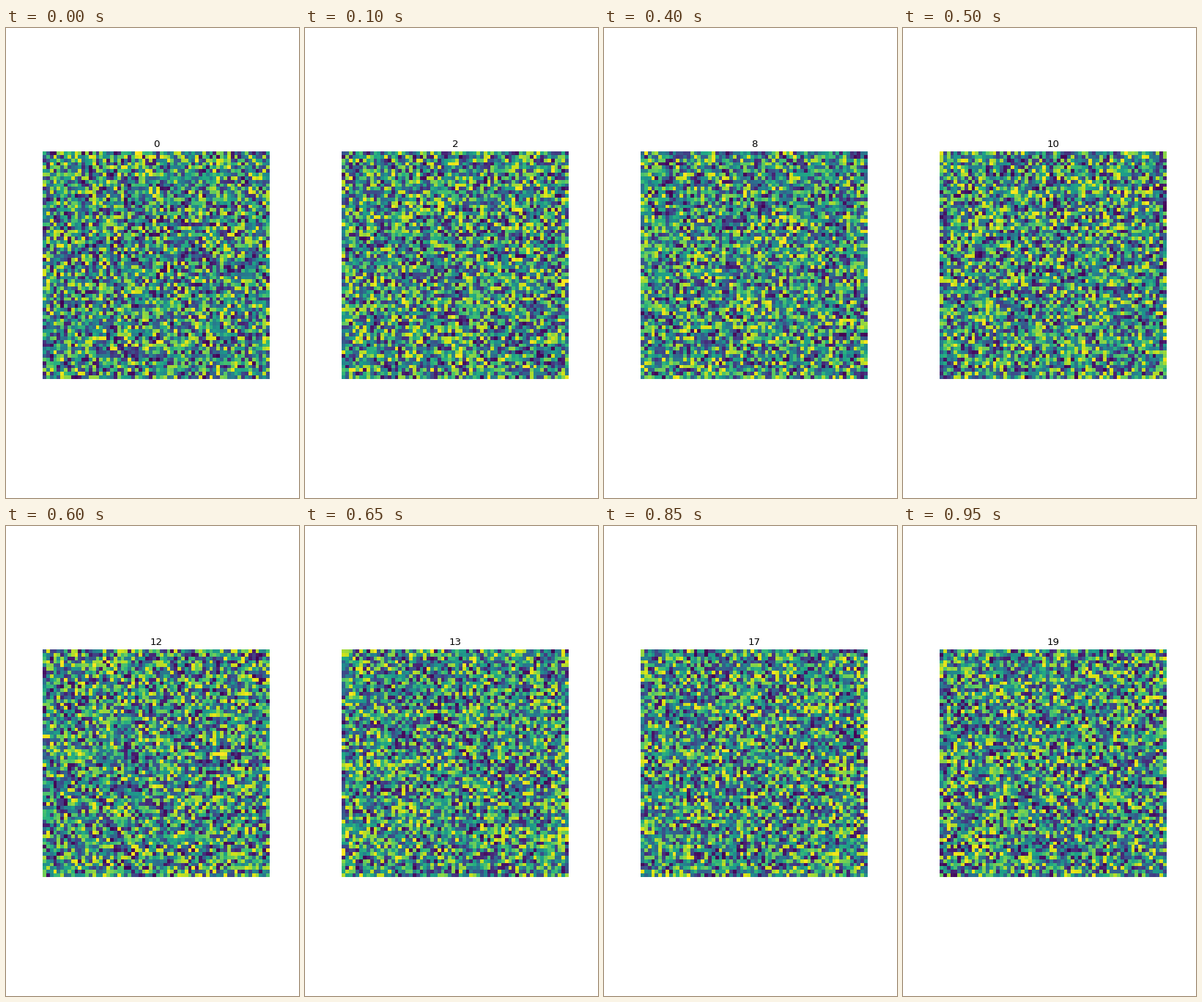
A matplotlib script for the animation above (1000 ms loop, 400x640 px).

```python
import matplotlib.pyplot as plt
import numpy as np
from matplotlib.animation import FuncAnimation

WIDTH, HEIGHT, DPI = 400, 640, 80
CELLS = 64
FRAMES, INTERVAL = 20, 50

fig, ax = plt.subplots(figsize=(WIDTH / DPI, HEIGHT / DPI), dpi=DPI)
ax.axis("off")


def noise(frame):
    return np.random.default_rng(frame).random((CELLS, CELLS))


image = ax.imshow(noise(0), cmap="viridis", vmin=0, vmax=1)
counter = ax.set_title("0", fontsize=12, family="DejaVu Sans", pad=6)


def update(frame):
    image.set_data(noise(frame))
    counter.set_text(str(frame))
    return image, counter


anim = FuncAnimation(fig, update, frames=FRAMES, interval=INTERVAL,
                     repeat=True, repeat_delay=0, blit=False)
plt.show()
```
